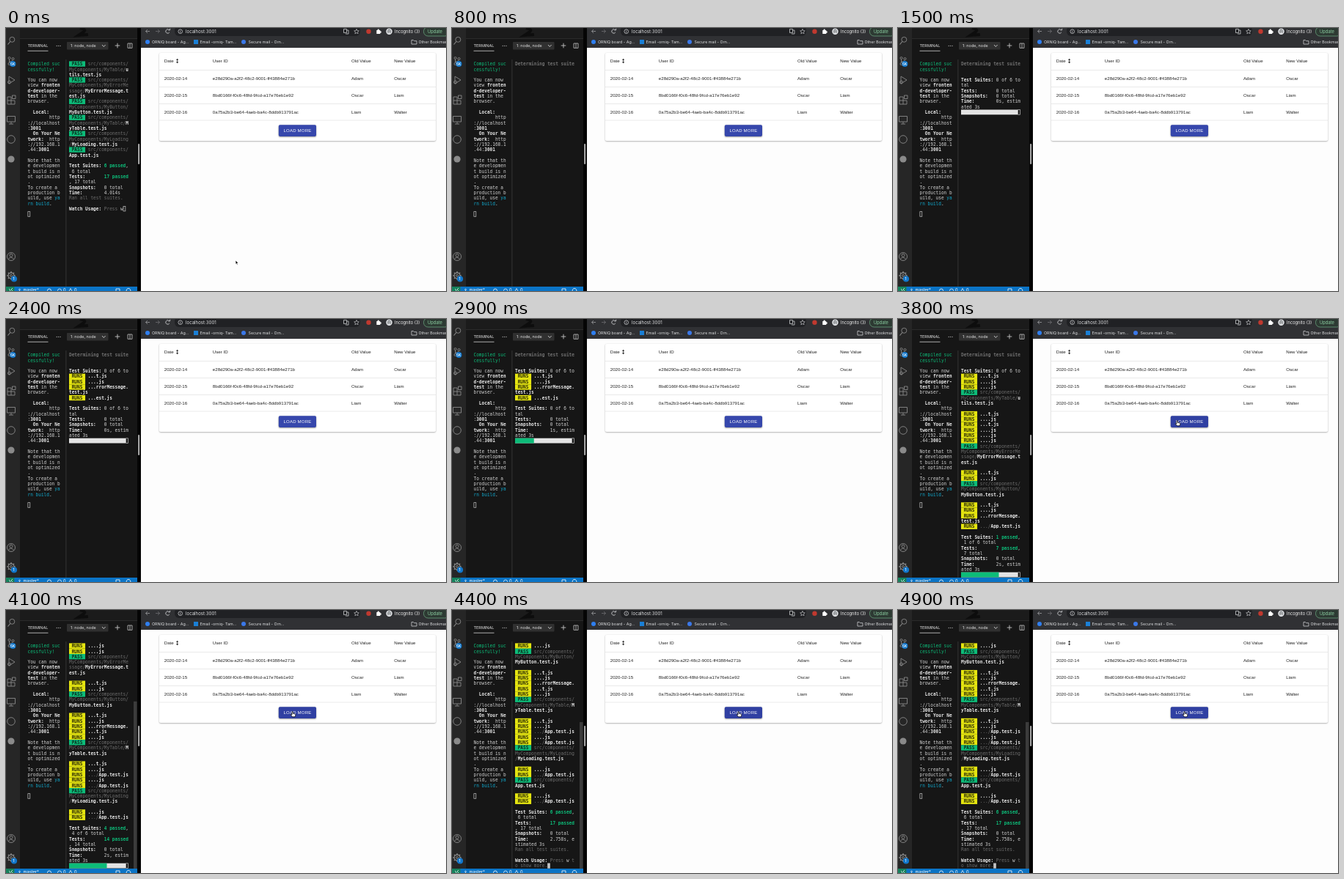
Animation of 600 by 359 pixels, one loop 5 s. Source, as an HTML page with a canvas:

```html
<!DOCTYPE html>
<html lang="en">
<head>
<meta charset="utf-8">
<title>Watch mode</title>
<style>
html, body { margin: 0; width: 100%; height: 100%; overflow: hidden; background: #161616; }
canvas { display: block; width: 600px; height: 359px; }
</style>
</head>
<body>
<canvas id="stage"></canvas>
<script>
const LOOP = 5000, W = 600, H = 359;
const canvas = document.getElementById('stage');
const ctx = canvas.getContext('2d');
const dpr = window.devicePixelRatio || 1;
canvas.width = W * dpr;
canvas.height = H * dpr;

const MONO = '"DejaVu Sans Mono", monospace';
const UI = 'Inter, sans-serif';
const PAGE = '"Liberation Sans", Arial, sans-serif';
const SIZE = 6.11, CW = 3.68, LH = 7.32, TOP = 49, ROWS = 42, COLS = 22;
const GREEN = '#0dbc79', YELLOW = '#e5e510';

// --- drawing helpers ---
function rect(x, y, w, h, color) {
  ctx.fillStyle = color;
  ctx.fillRect(x, y, w, h);
}

function round(x, y, w, h, r, color, stroke) {
  ctx.beginPath();
  ctx.roundRect(x, y, w, h, r);
  if (color) { ctx.fillStyle = color; ctx.fill(); }
  if (stroke) { ctx.strokeStyle = stroke; ctx.stroke(); }
}

function disc(x, y, r, color) {
  ctx.beginPath();
  ctx.arc(x, y, r, 0, 7);
  ctx.fillStyle = color;
  ctx.fill();
}

function ring(x, y, r, color, width = 0.9, from = 0, to = 7) {
  ctx.beginPath();
  ctx.arc(x, y, r, from, to);
  ctx.lineWidth = width;
  ctx.strokeStyle = color;
  ctx.stroke();
}

function path(d, x, y, color, width = 0.9, fill) {
  const p = new Path2D(d);
  ctx.save();
  ctx.translate(x, y);
  if (fill) { ctx.fillStyle = fill; ctx.fill(p); }
  if (color) { ctx.strokeStyle = color; ctx.lineWidth = width; ctx.stroke(p); }
  ctx.restore();
}

// y is the middle of the capitals; large font scaled down keeps exact advances
function text(s, x, y, size, color, font = UI, weight = 400, gap = 0) {
  ctx.save();
  ctx.translate(x, y + size * 0.36);
  ctx.scale(0.1, 0.1);
  ctx.font = `${weight} ${size * 10}px ${font}`;
  ctx.letterSpacing = gap * 10 + 'px';
  ctx.fillStyle = color;
  ctx.fillText(s, 0, 0);
  ctx.restore();
}

// --- terminal markup: ^x switches to style x ---
const STYLES = {
  n: [400, '#d0d0d0'], b: [700, '#e8e8e8'], d: [400, '#6c6c6c'], D: [700, '#707070'],
  g: [700, GREEN], G: [400, GREEN], c: [400, '#11a8cd'],
  P: [700, '#0b2b1e', GREEN], R: [700, '#2a2a05', YELLOW]
};

function wrap(src, cols) {
  const rows = [];
  for (const line of src.split('\n')) {
    let row = [], col = 0, style = 'n';
    rows.push(row);
    line.split(/\^(\w)/).forEach((part, i) => {
      if (i % 2) { style = part; return; }
      while (part) {
        if (col === cols) { rows.push(row = []); col = 0; }
        const s = part.slice(0, cols - col);
        row.push({ s, col, style });
        col += s.length;
        part = part.slice(s.length);
      }
    });
  }
  return rows;
}

function drawRow(row, x, y) {
  for (const { s, col, style } of row) {
    const [weight, color, back] = STYLES[style];
    const left = x + col * CW;
    if (back) rect(left, y - LH / 2, s.length * CW, LH, back);
    text(s, left, y, SIZE, color, MONO, weight);
  }
}

function cursor(x, y, solid) {
  if (solid) return rect(x, y - 3.6, CW, 7.2, '#c4c4c4');
  ctx.lineWidth = 0.7;
  ctx.strokeStyle = '#c8c8c8';
  ctx.strokeRect(x + 0.4, y - 3.3, CW - 0.8, 6.6);
}

// --- test runner output ---
const run = name => `^R RUNS ^n ^b${name}`;
const pass = (dir, file) => `^P PASS ^n ^dsrc/components/${dir}^b${file}.test.js`;
const T = run('...t.js'), J = run('....js');
const ERR = run('...rrorMessage.'), APP = run('^d.../^bApp.test.js');
const mine = (dir, file = dir) => pass(`MyComponents/${dir}/`, file);
const P = {
  utils: mine('MyTable', 'utils'), error: mine('MyErrorMessage'), button: mine('MyButton'),
  table: mine('MyTable'), loading: mine('MyLoading'), app: pass('', 'App')
};

const HEAD = ['^DDetermining test suite', '', ''];
const FIRST = [...HEAD, '^bTest Suites:^n 0 of 6 to'];
const LOG1 = [...FIRST, T, J, J, P.utils, '', T, J, T, J, J, J, P.error, '', T, J, P.button, ''];
const LOG2 = [...LOG1, T, J, ERR, T, J, P.table, '', T, J, APP, J, APP, P.loading, '', J, APP, ''];
const LOG3 = [...LOG2.slice(0, -1), P.app, '', J, APP, ''];

function summary(suites, tests, time, total = '') {
  const passed = n => n ? `^g${n} passed^n, ` : '';
  return [
    `^bTest Suites:^n ${passed(suites)}${total || suites + ' of 6'} total`,
    `^bTests:^n       ${passed(tests)}${tests} total`,
    '^bSnapshots:^n   0 total',
    `^bTime:^n        ${time}`
  ];
}
const live = (suites, tests, sec) => [...summary(suites, tests, sec + 's, estimated 3s'), ''];
const done = (time, hint) => [
  ...summary(6, 17, time, '6'), '^dRan all test suites.', '', '^bWatch Usage: ^dPress ^nw' + hint
];

const few = [...FIRST, T, J, ERR + 'test.js', run('...est.js'), ''];
const many = [...FIRST, T, J, T, J, ERR + 'test.js', run('...est.js'), ''];
const state = (at, lines, bar = -1, solid = false) =>
  ({ at, rows: wrap(lines.join('\n'), COLS), bar, solid });

const STATES = [
  state(0, [P.utils, P.error, P.button, P.table, P.loading, P.app, '', ...done('4.014s', '')]),
  state(800, HEAD),
  state(1400, [...HEAD, ...live(0, 0, 0)], 0),
  state(1800, [...few, ...live(0, 0, 0)], 0),
  state(2500, [...few, ...live(0, 0, 1)], 1),
  state(3000, [...many, ...live(0, 0, 1)], 1),
  state(3700, [...LOG1, T, J, ERR + 'test.js', APP, '', ...live(1, 7, 2)], 2),
  state(4000, [...LOG2, ...live(4, 14, 2)], 2),
  state(4300, [...LOG3, ...done('2.758s, estimated 3s', '^d to show more.')], -1, true)
];

const SERVER = wrap([
  '^GCompiled successfully!', '',
  'You can now view ^bfrontend-developer-test^n in the browser.', '',
  '^b  Local:^n            http://localhost:^b3001',
  '^b  On Your Network:^n  http://192.168.1.44:^b3001', '',
  'Note that the development build is not optimized.',
  'To create a production build, use ^cyarn build^n.', ''
].join('\n'), 12);

function terminal(t) {
  SERVER.forEach((row, i) => drawRow(row, 29.5, TOP + i * LH));
  cursor(29.5, TOP + 28 * LH);

  const { rows, bar, solid } = STATES.findLast(s => s.at <= t);
  const skip = Math.max(0, rows.length - ROWS);
  const x = 86;
  rows.slice(skip).forEach((row, i) => drawRow(row, x, TOP + i * LH));

  const last = rows[rows.length - 1];
  const end = last.reduce((n, p) => Math.max(n, p.col + p.s.length), 0);
  const y = TOP + (rows.length - 1 - skip) * LH;
  if (bar >= 0) {
    const len = 21 * CW;
    rect(x, y - 3.4, len, 6.8, '#e3e3e3');
    rect(x, y - 3.4, len * bar / 3, 6.8, GREEN);
    cursor(x + len, y);
  } else if (t < 800 || t >= 1400) {
    cursor(x + end * CW, y, solid);
  }
  if (skip) {
    const from = 43 + 311 * skip / rows.length;
    rect(174, from, 4.5, 354 - from, '#3c3c3c');
  }
}

// --- editor frame ---
function badge(x, y, s) {
  disc(x, y, 4.1, '#1177cc');
  text(s, x - s.length * 1.6, y, 4.6, '#fff', UI, 600);
}

function editor() {
  rect(0, 0, 180, H, '#161616');
  rect(0, 0, 19, H, '#262626');
  rect(19, 0, 160, 14, '#1b1b1b');
  rect(19, 14, 160, 0.7, '#343434');
  path('M2 0 Q12 2 6 6 L0 10 L13 9', 99, 0, '#0d0d0d', 4);

  const c = '#8a8a8a';
  ring(8.3, 15.8, 3.5, c);
  path('M5.8 18.5 L2.5 22.5', 0, 0, c, 1.1);
  ring(4.5, 41, 1.5, c);
  ring(4.5, 49, 1.5, c);
  ring(9.5, 42, 1.5, c);
  path('M4.5 42.5 V47.5 M9.5 43.5 Q9 46 4.5 46', 0, 0, c);
  badge(9.3, 49, '5K');
  path('M4 66 L12 71 L4 76 Z', 0, 0, c);
  ring(4.5, 74, 2, c);
  path('M2 94 H7 V104 H2 Z M2 99 H12 V104 H7 M8.5 92 H13 V96.5 H8.5 Z', 0, 0, c);
  path('M1.5 120.5 H12.5 V128 H1.5 Z M4 131 H10 M7 128 V131', 0, 0, c);
  ring(7, 152, 5.3, c);
  disc(7, 179, 4.6, c);
  ring(7, 312, 5.5, c);
  ring(7, 310.3, 2, c);
  ring(7, 317, 3.7, c, 0.9, Math.PI * 1.1, Math.PI * 1.9);
  ring(7, 338, 3.9, c, 1.2);
  ring(7, 338, 1.5, c);
  for (let i = 0; i < 8; i++) {
    const a = i * Math.PI / 4, u = Math.cos(a), v = Math.sin(a);
    path(`M${u * 4} ${v * 4} L${u * 5.7} ${v * 5.7}`, 7, 338, c, 1.5);
  }
  badge(11, 342.5, '1');

  text('TERMINAL', 29.5, 24.3, 5.5, '#e7e7e7');
  rect(29.5, 30.8, 28, 0.8, '#d0d0d0');
  for (let i = 0; i < 3; i++) disc(69.2 + i * 2.4, 24.3, 0.65, '#c5c5c5');
  round(83, 19, 56.5, 10.5, 1, '#303030');
  text('1: node, node', 88, 24.3, 5.5, '#e8e8e8');
  path('M131 23 L133.3 25.5 L135.6 23', 0, 0, '#d0d0d0');
  path('M148.7 24 H155.3 M152 20.7 V27.3', 0, 0, '#c5c5c5');
  path('M166 21 H172 V27.3 H166 Z M169 21 V27.3', 0, 0, '#c5c5c5', 0.8);
  rect(81.5, 43, 0.8, 310, '#3c3c3c');
}

function statusBar() {
  rect(0, 353, 180, 6, '#0b74c6');
  rect(0, 353, 11.5, 6, '#16825d');
  path('M4 356 L6 358 L4 360 M9 355 L7 357 L9 359', 0, 0, '#fff', 0.7);
  ring(18.5, 357, 0.9, '#fff', 0.6);
  path('M18.5 358 V360', 0, 0, '#fff', 0.7);
  text('master*', 23.5, 358, 5.7, '#fff');
  ring(59, 358.5, 2.5, '#fff', 0.8);
  ring(73, 358.5, 2.5, '#fff', 0.7);
  text('0', 78, 358, 5.7, '#fff');
  path('M85 361 L88 355.5 L91 361', 0, 0, '#fff', 0.7);
  text('0', 93, 358, 5.7, '#fff');
  path('M150 360 V356 H155 V360', 0, 0, '#fff', 0.8);
  path('M164 360 Q164 355.5 167 355.5 Q170 355.5 170 360', 0, 0, '#fff', 0.8);
}

// --- browser ---
function browser() {
  rect(179, 0, 5, H, '#050505');
  round(180, 158, 2.2, 28, 1.1, '#a5a5a5');
  rect(184, 0, 416, 27, '#303134');
  round(230, -3, 253, 14, 6, '#202124');

  const c = '#9a9b9e', light = '#dfe0e2';
  path('M196 4.5 H190.5 M193 2 L190.5 4.5 L193 7', 0, 0, c, 0.8);
  path('M204 4.5 H209.5 M207 2 L209.5 4.5 L207 7', 0, 0, '#6c6d70', 0.8);
  ring(220.5, 4.5, 2.7, light, 0.8, 0.5, 5.6);
  path('M221.5 2.8 H223.6 V0.8', 0, 0, light, 0.8);
  ring(237.7, 4.7, 2.8, light, 0.7);
  path('M237.7 4.3 V6.4 M237.7 2.8 V3.5', 0, 0, light, 0.7);
  text('localhost:3001', 245, 4.8, 6.1, light);
  path('M460.5 1.5 H464.5 V6.5 H460.5 Z M464.5 3 H467 V8 H463', 0, 0, light, 0.7);
  path('M0 -3.3 L1 -1 L3.3 -0.8 L1.6 0.8 L2.1 3 L0 1.8 L-2.1 3 L-1.6 0.8 L-3.3 -0.8 L-1 -1 Z', 478, 4.7, light, 0.6);
  disc(494.5, 4.7, 3.2, '#c0392f');
  round(505.3, 3, 5, 5, 0.6, '#fff');
  disc(507.8, 2.6, 1.2, '#fff');
  disc(510.6, 5.5, 1.2, '#fff');
  disc(522.5, 4.7, 4.2, '#e8eaed');
  path('M519.7 4.2 H525.3 M521 3.6 L521.5 2 H523.5 L524 3.6', 0, 0, '#3c4043', 0.7);
  ring(521.2, 6, 0.8, '#3c4043', 0.5);
  ring(523.8, 6, 0.8, '#3c4043', 0.5);
  text('Incognito (3)', 530, 4.8, 5.7, '#f0f0f0');
  ctx.lineWidth = 0.7;
  round(569.5, -1.5, 35, 12.5, 6, '#2d3a33', '#6fae84');
  text('Update', 575, 4.8, 5.8, '#8fd3a5');

  disc(193, 19, 3, '#2f7ff0');
  text('ORNIQ board - Ag...', 199, 19.3, 5.35, light);
  rect(256, 16, 6, 6, '#1b7fd6');
  text('Email -orniq- Tam...', 264.5, 19.3, 5.35, light);
  disc(324, 19, 3, '#3b78e8');
  text('Secure mail - Orn...', 330.5, 19.3, 5.35, light);
  path('M553 16.5 H555.5 L556.5 17.7 H560 V22 H553 Z', 0, 0, light, 0.7);
  text('Other Bookmarks', 562.5, 19.3, 5.35, light);
}

const RECORDS = [
  ['2020-02-14', 'e28d290a-a2f2-48c2-9001-ff43884e271b', 'Adam', 'Oscar'],
  ['2020-02-15', '8bd0166f-f0c6-48fd-9fcd-a17e76eb1e92', 'Oscar', 'Liam'],
  ['2020-02-16', '0a75a2b3-be64-4aeb-ba4c-8ddb913791ac', 'Liam', 'Walter']
];
const COLUMNS = [215.7, 281.8, 471, 529.2];

function page(hover) {
  rect(184, 26.5, 416, H, '#fdfdfd');
  ctx.save();
  ctx.shadowColor = 'rgba(0,0,0,.35)';
  ctx.shadowBlur = 2 * dpr;
  ctx.shadowOffsetY = 0.7 * dpr;
  round(209, 34, 377, 120, 1.8, '#fff');
  ctx.restore();

  const cells = (list, y) => list.forEach((s, i) => text(s, COLUMNS[i], y, 6.16, '#222', PAGE));
  cells(['Date', 'User ID', 'Old Value', 'New Value'], 45.2);
  path('M0 -3.2 L1.7 -1.2 H-1.7 Z M0 3.2 L1.7 1.2 H-1.7 Z', 233.6, 45, null, 0, '#222');
  path('M0 -2 V2', 233.6, 45, '#222', 0.7);
  RECORDS.forEach((r, i) => cells(r, 69 + i * 22.8));
  for (const y of [57, 80, 103, 125.7]) rect(209, y, 377, 0.6, '#dcdcdc');

  ctx.save();
  ctx.shadowColor = 'rgba(0,0,0,.45)';
  ctx.shadowBlur = 2 * dpr;
  ctx.shadowOffsetY = 0.8 * dpr;
  round(371.8, 132.3, 51.2, 15.6, 1.8, hover ? '#3040a2' : '#3647ac');
  ctx.restore();
  text('LOAD MORE', 378.5, 140.2, 6.1, '#fff', PAGE, 400, 0.16);
}

// --- pointer: [time, x, y] ---
const MOVES = [[3100, 313, 317], [3500, 365.5, 137], [3800, 380, 139], [4050, 390, 139]];

function pointerAt(t) {
  if (t < 800) return MOVES[0].slice(1);
  if (t < 3100) return null;
  const i = MOVES.findIndex(m => m[0] > t);
  if (i < 0) return MOVES[MOVES.length - 1].slice(1);
  const [t0, x0, y0] = MOVES[i - 1], [t1, x1, y1] = MOVES[i];
  const k = (t - t0) / (t1 - t0), e = k * k * (3 - 2 * k);
  return [x0 + (x1 - x0) * e, y0 + (y1 - y0) * e];
}

function pointer(x, y, hand) {
  if (hand) {
    path('M0 0 Q1 -0.7 1.5 0.3 V2.4 L4.2 3 Q5 3.4 4.8 4.6 L4 6.8 H0.6 L-1.8 3.9 Q-1.5 3 0 4 Z', x, y, '#111', 0.8, '#fff');
  } else {
    path('M0 0 V5.6 L1.3 4.5 L2.2 6.5 L3.2 6 L2.3 4.1 H4 Z', x, y, '#fff', 0.8, '#000');
  }
}

function draw(now) {
  const t = now % LOOP;
  const at = pointerAt(t);
  const over = !!at && at[0] > 372 && at[0] < 423 && at[1] > 132 && at[1] < 148;
  ctx.setTransform(dpr, 0, 0, dpr, 0, 0);
  editor();
  terminal(t);
  statusBar();
  page(over);
  browser();
  if (at) pointer(at[0], at[1], over);
}

const start = performance.now();
function tick() {
  draw(performance.now() - start);
  requestAnimationFrame(tick);
}
tick();
</script>
</body>
</html>
```
